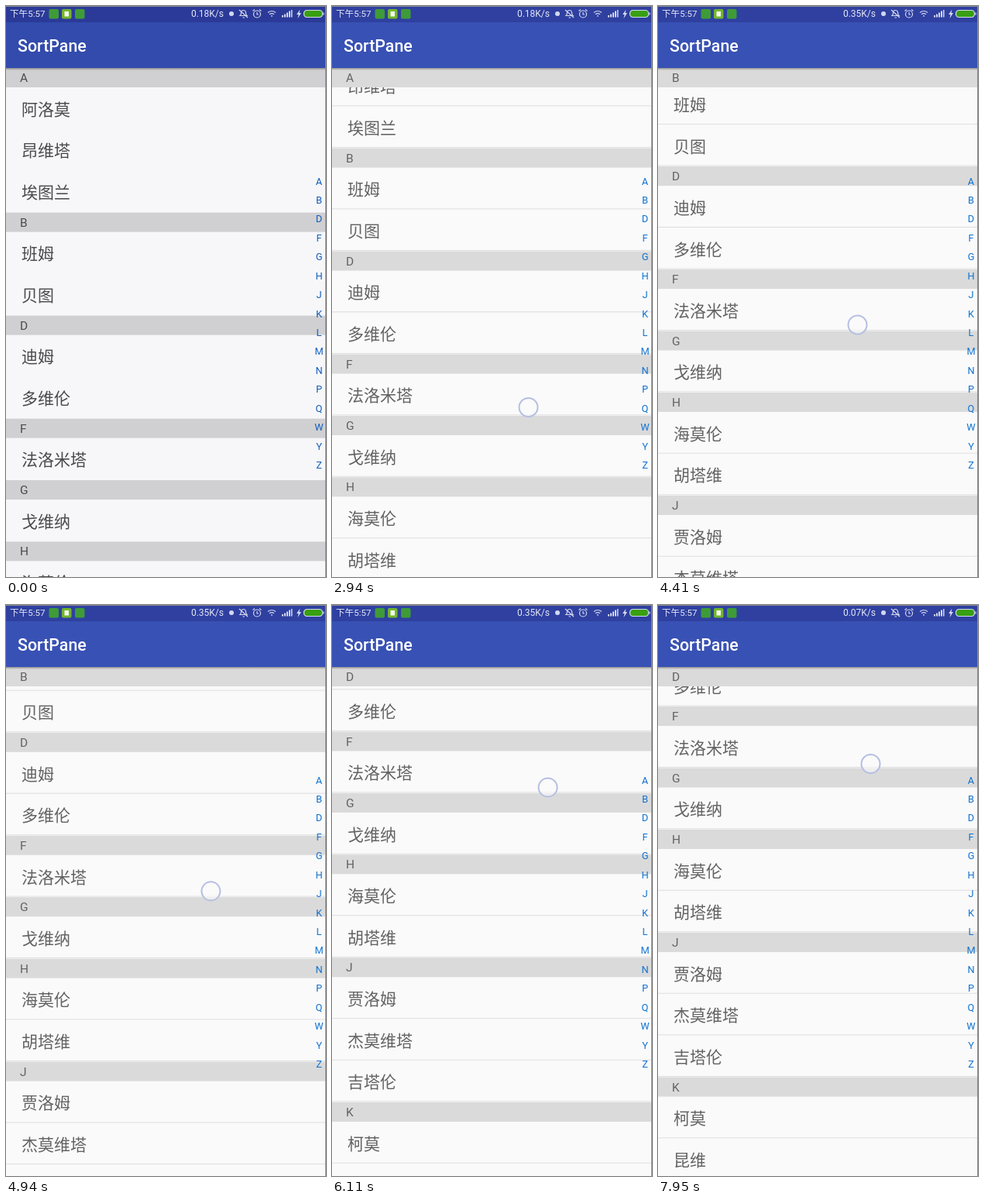
Animation of 413 by 737 pixels, one loop 8000 ms. Source, as an HTML page:

```html
<!DOCTYPE html>
<html lang="zh-CN">
<head>
<meta charset="utf-8">
<title>SortPane</title>
<style>
  html, body { margin: 0; width: 100%; height: 100%; overflow: hidden; }
  #stage {
    --paper: #fafafa; --band: #dadada; --ink: #626262; --bar: #3851b4; --top: #2f40a0; --link: #1073d2; --rule: #dfdfdf;
    position: relative; width: 413px; height: 737px; overflow: hidden;
    background: var(--paper); font-family: Roboto, "Noto Sans CJK SC", sans-serif;
  }
  #stage.dim {
    --paper: #f7f7f9; --band: #d0d0d2; --ink: #4a4a4c; --bar: #324bac; --top: #2b3a98; --link: #125fbc; --rule: transparent;
  }
  #stage div { position: absolute; box-sizing: border-box; white-space: nowrap; }
  #list { left: 0; top: 79.5px; width: 412px; height: 658px; overflow: hidden; }
  #list div { left: 0; top: 0; width: 100%; color: var(--ink); }
  #list .row {
    height: 53.6px; padding-left: 20px; border-bottom: 1px solid var(--rule);
    font: 21px/53px "Noto Sans CJK SC", sans-serif;
  }
  #stage.touch .row.marked { border-color: #dcdce2; }
  #list .head { height: 25.8px; padding-left: 18px; background: var(--band); font-size: 15.5px; line-height: 27.8px; }
  #index div { left: 392px; width: 24px; text-align: center; font-size: 12.8px; line-height: 20px; color: var(--link); }
  #bar { left: 0; top: 21px; width: 413px; height: 58.5px; padding-left: 15px; background: var(--bar); color: #fff; font-size: 21.4px; font-weight: 500; line-height: 62px; }
  #bar::after { content: ""; position: absolute; left: 0; top: 58.5px; width: 100%; height: 3px; background: linear-gradient(#0005, #0000); }
  #status { left: 0; top: 0; width: 413px; height: 21px; background: var(--top); color: #e3e6f5; font-size: 12px; line-height: 20px; }
  #clock { left: 5px; font-size: 11.6px; }
  #speed { right: 132px; }
  #status svg { position: absolute; left: 0; top: 0; }
  #touch { left: -13px; top: -13px; width: 26px; height: 26px; border: 2px solid #b6bfe2; border-radius: 50%; background: #fafafa99; }
  #stage.dim #touch { border-color: #bcbcc0; }
  #edge { inset: 0; border: solid #8a8a8e; border-width: 1px 1px 0 0; }
</style>
</head>
<body>
<div id="stage">
  <div id="list"></div>
  <div id="index"></div>
  <div id="bar">SortPane</div>
  <div id="status">
    <div id="clock">下午5:57</div>
    <div id="speed"></div>
    <svg width="413" height="21" fill="none" stroke="#d3d8ef" stroke-width="1.2">
      <g stroke="none">
        <rect x="55.5" y="4" width="12.5" height="12.5" rx="2" fill="#3f9b38"/>
        <rect x="72" y="4" width="12.5" height="12.5" rx="2" fill="#72b52d"/>
        <rect x="75.5" y="7" width="5.5" height="6.5" fill="#f2f8ea"/>
        <rect x="89" y="4" width="12.5" height="12.5" rx="2" fill="#3f9b38"/>
        <circle cx="291" cy="10" r="3" fill="#d3d8ef"/>
        <path d="M356 12h2v2.5h-2zM359 10.5h2v4h-2zM362 8.5h2v6h-2zM365 6.5h2v8h-2zM368 5h1.5v9.5h-1.5zM379.5 4.5l-4.5 6.5h2.5l-1 5 4.5-7h-2.5z" fill="#d3d8ef"/>
      </g>
      <path d="M302 12.5h9q-1.5-1.500-1.500-4a3 3 0 0 0-6 0q0 2.500-1.500 4zM305.500 15h2.500M301 5l11 10"/>
      <circle cx="324" cy="10.500" r="4.500"/>
      <path d="M324 8v3h2M318.500 6.500l2.500-2M329.500 6.500l-2.500-2"/>
      <path d="M338 8.500q5-4 10 0M340 10.800q3-2.400 6 0M342 12.800h2"/>
      <rect x="384.500" y="5.500" width="24" height="9" rx="4" fill="#38a012"/>
      <path d="M410 8.500v3"/>
    </svg>
  </div>
  <div id="edge"></div>
  <div id="touch"></div>
</div>
<script>
const LOOP = 8000, HEAD = 25.8, ROW = 53.6;
const sections = {
  A: "阿洛莫 昂维塔 埃图兰", B: "班姆 贝图", D: "迪姆 多维伦", F: "法洛米塔", G: "戈维纳",
  H: "海莫伦 胡塔维", J: "贾洛姆 杰莫维塔 吉塔伦", K: "柯莫 昆维", L: "洛维姆"
};
// Screen refreshes come in bursts: first, last, count
const bursts = [
  [2040, 3060, 9], [3180, 4170, 8], [4290, 5240, 8],
  [5360, 6380, 9], [6530, 7250, 6], [7530, 7950, 4]
];
// time, scroll, finger x, finger y
const drag = [
  [2040, 0, 252.5, 602.5], [2932, 83, 253.5, 518], [4426, 192.5, 257.5, 411.5], [5488, 303, 275.5, 301.5],
  [6818, 441, 282, 163.5], [7250, 446, 281, 159], [7390, 446, 281, 159], [7950, 401.5, 274.5, 205]
];

const $ = id => document.getElementById(id);
const stage = $("stage"), list = $("list"), touch = $("touch");

function add(parent, text, className = "") {
  const el = document.createElement("div");
  el.textContent = text;
  el.className = className;
  return parent.appendChild(el);
}
const moveY = (el, y) => el.style.transform = `translateY(${y}px)`;

const rows = [], heads = [];
let height = 0;
for (const [letter, names] of Object.entries(sections)) {
  heads.push({ letter, top: height });
  height += HEAD;
  for (const name of names.split(" ")) {
    rows.push({ el: add(list, name, "row"), top: height });
    height += ROW;
  }
}
for (const head of heads) head.el = add(list, head.letter, "head");
rows[5].el.classList.add("marked");
[..."ABDFGHJKLMNPQWYZ"].forEach((c, i) => add($("index"), c).style.top = 216.5 + i * 24.43 + "px");

function refreshTime(t) {
  let latest = 0;
  for (const [first, last, count] of bursts) {
    if (t < first) break;
    const gap = (last - first) / (count - 1);
    latest = first + gap * Math.min(count - 1, Math.floor((t - first + 16) / gap));
  }
  return latest;
}

function dragAt(t) {
  const next = drag.findIndex(key => key[0] >= t);
  if (next === 0) return drag[0];
  if (next < 0) return drag[drag.length - 1];
  const a = drag[next - 1], b = drag[next], k = (t - a[0]) / (b[0] - a[0]);
  return a.map((v, i) => v + (b[i] - v) * k);
}

function draw(t) {
  const shown = refreshTime(t);
  const [, scroll, x, y] = dragAt(shown);
  for (const row of rows) moveY(row.el, row.top - scroll);
  heads.forEach((head, i) => {
    const next = heads[i + 1] ? heads[i + 1].top : height;
    // A pinned header is pushed out by the one that follows
    moveY(head.el, Math.max(head.top - scroll, Math.min(0, next - scroll - HEAD)));
  });
  stage.classList.toggle("dim", shown < 2100);
  stage.classList.toggle("touch", shown > 0);
  touch.style.display = shown ? "" : "none";
  touch.style.transform = `translate(${x}px, ${y}px)`;
  $("speed").textContent = (t < 3600 ? "0.18" : t < 7660 ? "0.35" : "0.07") + "K/s";
}

const start = performance.now();
function frame() {
  draw((performance.now() - start) % LOOP);
  requestAnimationFrame(frame);
}
frame();
</script>
</body>
</html>
```
